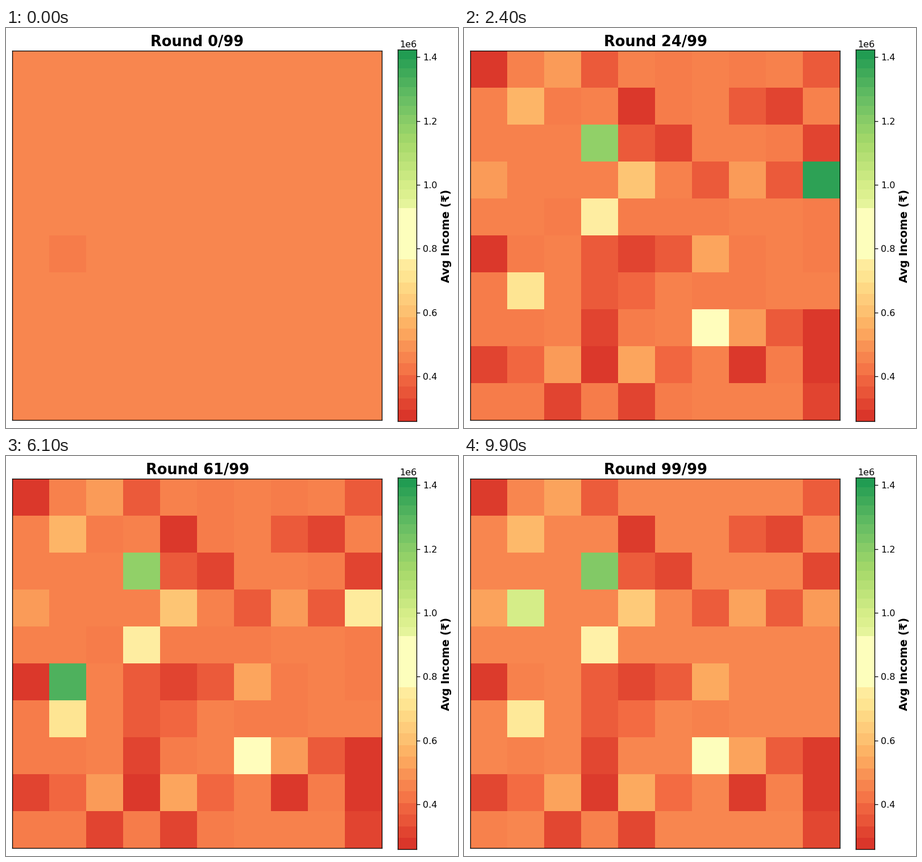
Write a matplotlib script that moves like this. It is 795 px wide and 704 px high and loops after 10 s.

```python
import numpy as np
import matplotlib.pyplot as plt
from matplotlib.animation import FuncAnimation
from matplotlib.colors import ListedColormap, Normalize

W, H, DPI = 795, 704, 100
ROUNDS = 100
LOW, HIGH = 25.9, 142.3        # incomes are in units of 10,000
RAISE = 82                     # round with a general pay rise

plt.rcParams["font.family"] = "DejaVu Sans"
cmap = ListedColormap(plt.get_cmap("RdYlGn")(np.linspace(0.1, 0.9, 512)))
norm = Normalize(LOW, HIGH)

# Cells (10 * row + column) that leave the typical income, early and later on
EARLY = {28: [0, 14, 50, 79, 83, 87, 89], 31: [25, 29, 73, 80, 92, 94, 99],
         36: [3, 9, 17, 36, 38, 53, 54, 63], 39: [64, 81],
         51: [30, 37, 56, 77, 82], 57: [34], 62: [43, 76, 84], 68: [61],
         83: [11], 118: [23]}
LATE = {31: [18, 54], 36: [24, 55, 78], 39: [85], 51: [2], 53: [56, 84],
        57: [11], 62: [34], 72: [61], 76: [43], 83: [76]}

# The richest household moves house: (round, cell, income)
MOVES = [(8, 39, 138), (30, 31, 137), (42, 39, 142), (50, 31, 137),
         (58, 51, 132), (72, 39, 142), (RAISE, 31, 100)]


def simulate():
    """Income of every cell in every round."""
    rng = np.random.default_rng(4)
    rounds = np.arange(ROUNDS)[:, None]

    # Typical cells, a changing share of them slightly poorer
    share = np.interp(rounds, [0, 12, 24, RAISE - 1, RAISE],
                      [0.05, 0.2, 0.5, 0.5, 0.15])
    typical = np.where(rounds < 17, 46.4, 45.4)
    grid = np.where(rng.random(100) < share, 44.2, typical)

    for groups, first, last in (EARLY, 1, 11), (LATE, 13, 23):
        for income, cells in groups.items():
            for cell in cells:
                grid[rng.integers(first, last):, cell] = income
    grid[RAISE:] *= 1.025

    grid[MOVES[0][0]:RAISE, 39] = 75
    grid[RAISE:, 39] = 51
    ends = [move[0] for move in MOVES[1:]] + [ROUNDS]
    for (start, cell, income), end in zip(MOVES, ends):
        grid[start:end, cell] = income
    return grid.reshape(ROUNDS, 10, 10)


def pt(pixels):
    return pixels * 72 / DPI


def add_axes(left, top, right, bottom):
    ax = fig.add_axes([left / W, 1 - bottom / H,
                       (right - left) / W, (bottom - top) / H])
    for spine in ax.spines.values():
        spine.set_linewidth(pt(1.3))
    return ax


def add_text(x, y, text, size, **kw):
    return fig.text(x / W, 1 - y / H, text, fontsize=pt(size),
                    va="baseline", **kw)


incomes = simulate()
fig = plt.figure(figsize=(W / DPI, H / DPI), dpi=DPI, facecolor="white")

ax = add_axes(11.4, 40.3, 661.45, 690.3)
mesh = ax.pcolormesh(incomes[0], cmap=cmap, norm=norm)
ax.invert_yaxis()
ax.set_xticks([])
ax.set_yticks([])
title = add_text(336.5, 31.6, "", 25.6, ha="center", weight="bold")

# Colour scale in bands, with a wide pale one in the middle
edges = np.r_[np.linspace(LOW, 76.7, 15), np.linspace(92.7, HIGH, 18)]
middles = (edges[:-1] + edges[1:]) / 2
bar = add_axes(689.2, 38.3, 722.2, 692.3)
bar.pcolormesh([0, 1], edges, middles[:, None], cmap=cmap, norm=norm)
bar.set_ylim(LOW, HIGH)
bar.set_xticks([])
bar.yaxis.tick_right()
ticks = np.arange(40, 141, 20)
bar.set_yticks(ticks, [f"{t / 100:.1f}" for t in ticks])
bar.tick_params(axis="y", length=pt(5.6), width=pt(1.3), pad=pt(5.6),
                labelsize=pt(16))
add_text(692, 34, "1e6", 16, ha="left")
add_text(780, 365.5, "Avg Income (₹)", 19.3, ha="center", weight="bold",
         rotation=90, rotation_mode="anchor")


def update(n):
    mesh.set_array(incomes[n])
    title.set_text(f"Round {n}/{ROUNDS - 1}")
    return mesh, title


anim = FuncAnimation(fig, update, frames=ROUNDS, interval=100, repeat=True,
                     repeat_delay=0, blit=False)
plt.show()
```
